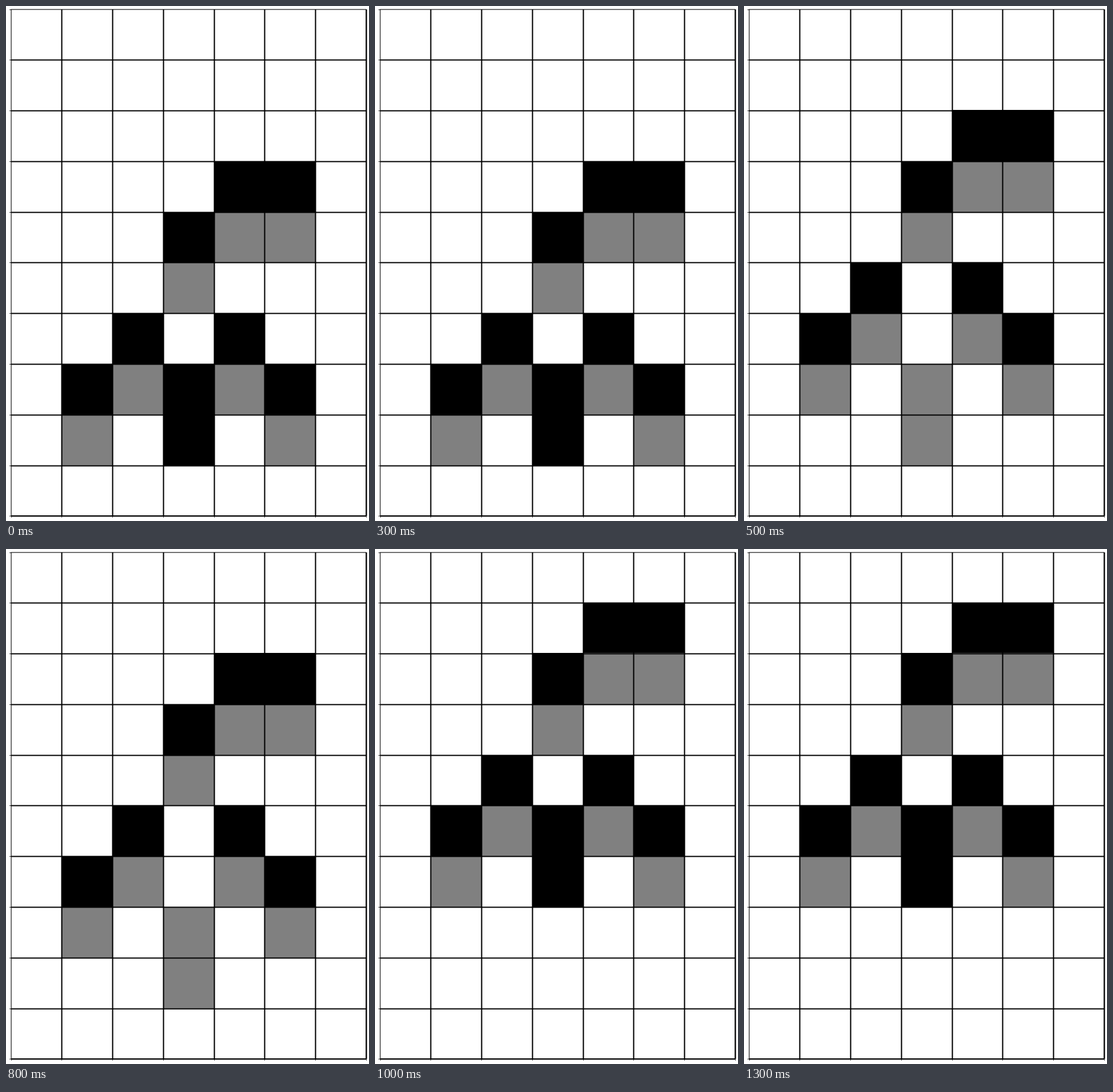
Write an HTML page with a canvas that moves like this. It is 628 by 892 pixels and loops after 1500 ms.

```html
<!DOCTYPE html>
<html lang="en">
<head>
<meta charset="utf-8">
<title>Grid ship</title>
<style>
  html, body { margin: 0; width: 100%; height: 100%; overflow: hidden; background: #fff; }
  canvas { display: block; }
</style>
</head>
<body>
<canvas id="stage" width="628" height="892"></canvas>
<script>
const ctx = document.getElementById('stage').getContext('2d');
const COLS = 7, ROWS = 10, CELL = 87.77, LEFT = 8.6, TOP = 5.6;
const GRID = 2.08, FRAME = 1.11, TICK = 0.83;
const STEP = 500, STEPS = 3;

// [row, column] at step 0; the ship climbs one row per step
const BODY = [[3, 4], [3, 5], [4, 3], [6, 2], [6, 4], [7, 1], [7, 5]];
const FLAME = [[7, 3], [8, 3]];

const lineX = c => Math.round(LEFT + c * CELL);
const lineY = r => Math.round(TOP + r * CELL);
// the fill boundary above row 2 sits one pixel above its grid line
const fillY = r => lineY(r) - (r === 2 ? 1 : 0);

function cellsAt(step) {
  const burning = step >= 0 && step % 2 === 0;
  return (burning ? BODY.concat(FLAME) : BODY).map(([r, c]) => [r - step, c]);
}

function fillCells(cells, color) {
  ctx.fillStyle = color;
  for (const [r, c] of cells) {
    const x = lineX(c), y = fillY(r);
    ctx.fillRect(x, y, lineX(c + 1) - x, fillY(r + 1) - y);
  }
}

function line(x1, y1, x2, y2, width) {
  ctx.lineWidth = width;
  ctx.beginPath();
  ctx.moveTo(x1, y1);
  ctx.lineTo(x2, y2);
  ctx.stroke();
}

function drawGrid() {
  const x1 = lineX(0), x2 = lineX(COLS);
  const y1 = lineY(0), y2 = lineY(ROWS);
  ctx.strokeStyle = '#000';
  for (let c = 0; c <= COLS; c++) {
    const x = lineX(c) + 0.5;
    if (c > 0) line(x, y1, x, y2, GRID);
    line(x, y2, x, y2 + 3, TICK);
  }
  for (let r = 0; r <= ROWS; r++) {
    const y = lineY(r) + 0.5;
    if (r > 0) line(x1, y, x2, y, GRID);
    line(x1 - 3, y, x1, y, TICK);
  }
  ctx.lineWidth = FRAME;
  ctx.strokeRect(x1, y1, x2 - x1, y2 - y1);
}

function draw(step) {
  ctx.fillStyle = '#fff';
  ctx.fillRect(0, 0, 628, 892);
  // the previous position lingers as a grey trail
  fillCells(cellsAt(step - 1), '#808080');
  fillCells(cellsAt(step), '#000');
  drawGrid();
}

let shown = -1;
function tick() {
  const step = Math.floor(performance.now() / STEP) % STEPS;
  if (step !== shown) draw(shown = step);
  requestAnimationFrame(tick);
}
tick();
</script>
</body>
</html>
```
